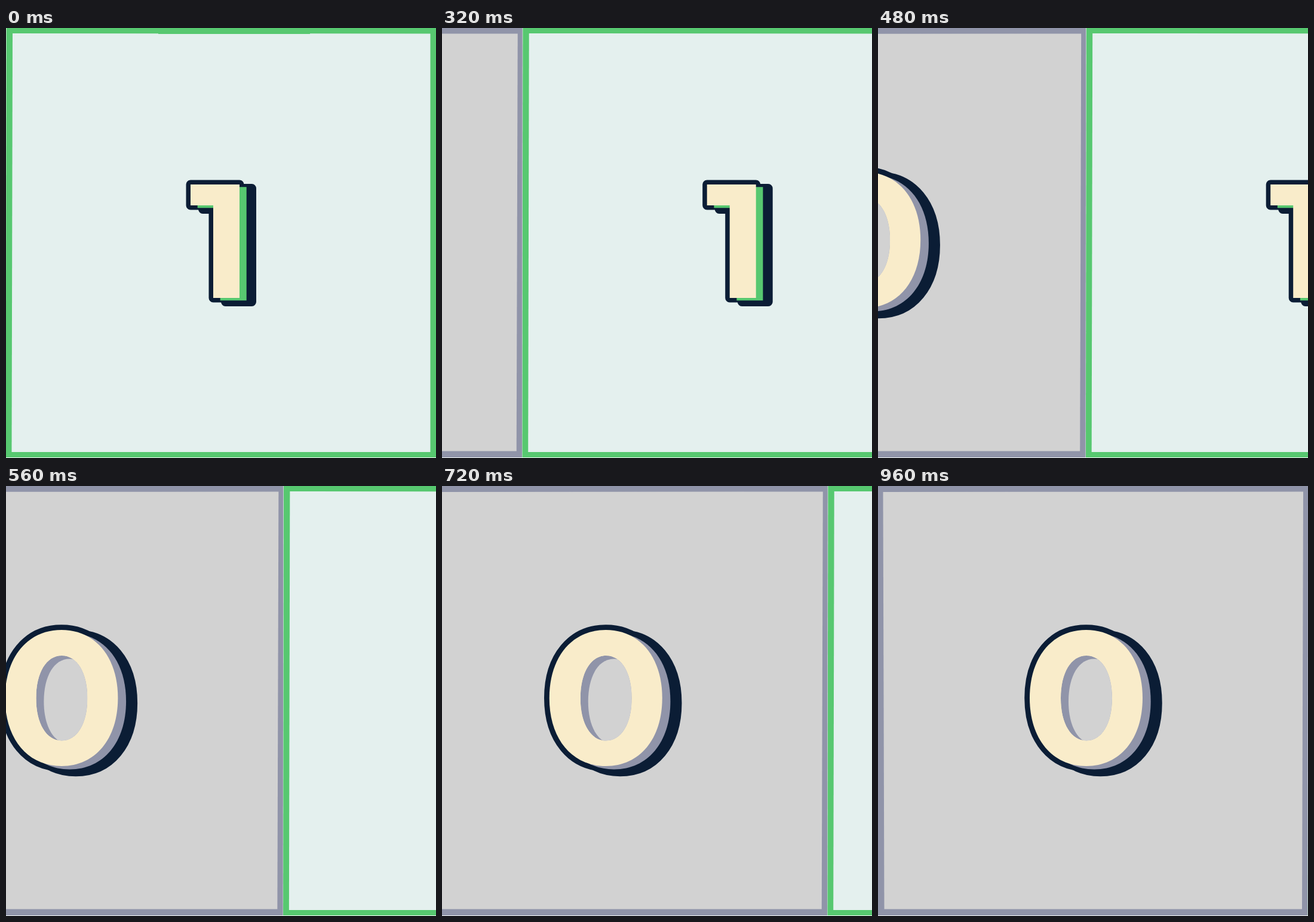
Write an HTML page that moves like this. It is 720 by 720 pixels and loops after 1040 ms.

```html
<!DOCTYPE html>
<html lang="en">
<head>
<meta charset="utf-8">
<title>One to zero slide</title>
<style>
  html, body { margin: 0; width: 100%; height: 100%; overflow: hidden; background: #f4f7f7; }
  svg { display: block; width: 100vw; height: 100vh; }
  .navy { fill: #0b1d35; stroke: #0b1d35; stroke-linejoin: round; }
  .green { fill: #57c870; }
  .mint { fill: #e4f0ee; }
  .slate { fill: #9094a9; }
  .gray { fill: #d2d2d2; }
  .cream { fill: #f9ecca; }
</style>
</head>
<body>
<svg viewBox="0 0 720 720">
  <defs>
    <path id="one" d="M309 262H391V452H347V297H309Z"/>
    <path id="bowl" d="M254 355C254 286.6 291.8 241 348.5 241S443 286.6 443 355S405.2 469 348.5 469S254 423.4 254 355Z"/>
    <path id="hole" d="M306 355.3C306 312.6 323.2 284.1 349 284.1S392 312.6 392 355.3S374.8 426.5 349 426.5S306 398 306 355.3Z"/>
    <clipPath id="inHole"><use href="#hole"/></clipPath>
  </defs>

  <g id="onePanel">
    <path class="green" d="M.6 0H720V719H-.3Z"/>
    <path class="mint" d="M11 9L710.5 9.5V710H9.5Z"/>
    <g class="navy" stroke-width="15">
      <use href="#one" x="20.5" y="6.5"/>
      <use href="#one"/>
    </g>
    <use class="green" href="#one" x="11.7" y="4.3"/>
    <use class="cream" href="#one"/>
  </g>

  <g id="zeroPanel">
    <path class="slate" d="M0 0H720L719.3 719H0Z"/>
    <path class="gray" d="M8.5 10L712 9.5L710 708.5H10.5Z"/>
    <g class="navy" stroke-width="17.5">
      <use href="#bowl" x="24" y="8.5"/>
      <use href="#bowl"/>
    </g>
    <use class="slate" href="#bowl" x="13.7" y="5.5"/>
    <use class="cream" href="#bowl"/>
    <g clip-path="url(#inHole)">
      <use class="slate" href="#hole"/>
      <use class="gray" href="#hole" x="13" y="5.5"/>
    </g>
  </g>
</svg>
<script>
  const LOOP = 1040, STEP = 40, LAST = 960, GLIDE = 976, SIZE = 720;
  const onePanel = document.getElementById('onePanel');
  const zeroPanel = document.getElementById('zeroPanel');
  const start = performance.now();

  // Symmetric ease in and out, steeper in the middle than smootherstep.
  const ease = x => x ** 3 * (6 + x * (5 + x * (-30 + x * (28 - 8 * x))));

  const place = (panel, x) => panel.setAttribute('transform', `translate(${x} 0)`);

  function draw(now) {
    const time = Math.max(0, now - start) % LOOP;
    const held = Math.min(Math.floor(time / STEP) * STEP, LAST);
    const shift = held === LAST ? SIZE : SIZE * ease(held / GLIDE);
    place(onePanel, shift);
    place(zeroPanel, shift - SIZE);
    requestAnimationFrame(draw);
  }
  draw(start);
</script>
</body>
</html>
```
